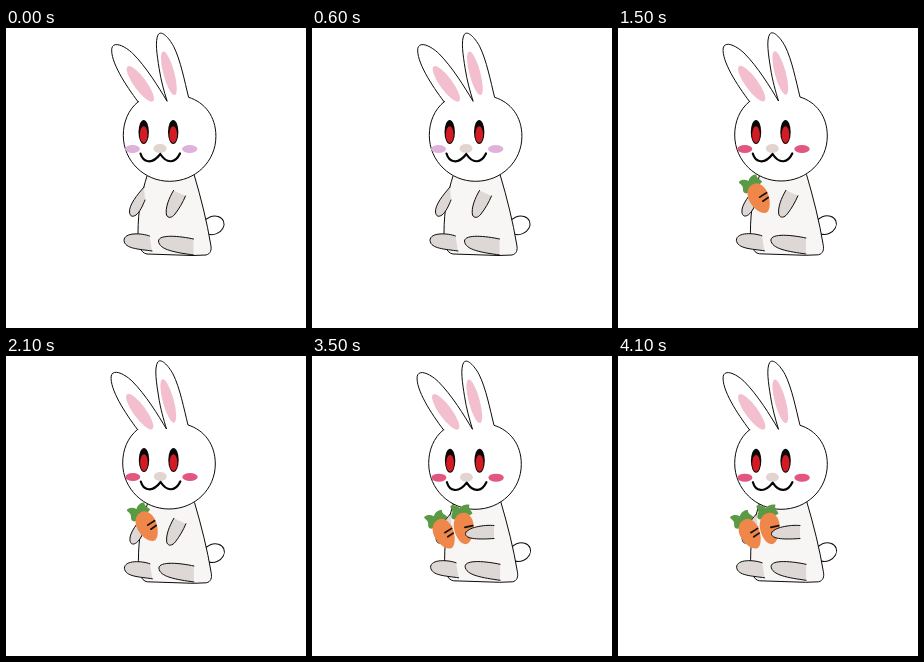
Recreate the animation shown at these times as an HTML page. Size 300 by 300 pixels, loop 4500 ms.

```html
<!DOCTYPE html>
<html lang="en">
<head>
<meta charset="utf-8">
<title>Rabbit with carrots</title>
<style>
  html, body { margin: 0; width: 100%; height: 100%; overflow: hidden; background: #fff; }
  svg { display: block; width: 100vw; height: 100vh; animation: pose 4500ms step-end infinite; }

  .line { stroke: #0d0b0b; stroke-width: 1; stroke-linejoin: round; stroke-linecap: round; }
  .edge { fill: none; }
  .white { fill: #fff; }
  .fur { fill: #f7f6f5; }
  .paw { fill: #ddd8d6; }
  .pink { fill: #f3bfcf; }
  .mouth { fill: none; stroke: #050404; stroke-width: 2.2; stroke-linecap: round; stroke-linejoin: round; }

  .head { transform: var(--head); }
  .face { transform: var(--face); }
  .body { transform: var(--body); }
  .foot { transform: translateY(var(--foot)); }
  .cheeks { fill: var(--blush); }
  .empty { visibility: var(--empty); }
  .single { visibility: var(--single); }
  .pair { visibility: var(--pair); }

  /* Each pose holds until the next hard cut. */
  @keyframes pose {
    0% {
      --head: translate(.6px, .3px); --face: translate(0, 0); --body: translate(0, 0); --foot: 0px;
      --blush: #dfb2da; --empty: visible; --single: hidden; --pair: hidden;
    }
    22.2222% {
      --head: translate(-.9px, -.2px); --face: translate(-.4px, 0); --body: translate(-.4px, .3px); --foot: 0px;
      --blush: #dfb2da; --empty: visible; --single: visible; --pair: hidden;
    }
    33.3333% {
      --head: translate(0, 0); --face: translate(.3px, 0); --body: translate(.4px, -.2px); --foot: -.8px;
      --blush: #e1577f; --empty: visible; --single: visible; --pair: hidden;
    }
    55.5556% {
      --head: translate(.2px, -.6px); --face: translate(.7px, -.8px); --body: translate(.9px, -.9px); --foot: -3px;
      --blush: #e1577f; --empty: visible; --single: visible; --pair: hidden;
    }
    77.7778%, 100% {
      --head: translate(0, .3px); --face: translate(.4px, .7px); --body: translate(.6px, -1.2px); --foot: -1.5px;
      --blush: #e1577f; --empty: hidden; --single: hidden; --pair: visible;
    }
  }
</style>
</head>
<body>
<svg viewBox="0 0 300 300" role="img" aria-label="A white rabbit holding carrots">
  <defs>
    <g id="carrot">
      <path fill="#5b9a45" d="M-9-10 C-13-12-11-14-10-17 C-9-20-12-22-11-24 C-7-25-4-23-2-20.500 C1-24 5-24 8-23 C6-19 9-18 10-14 C7-12 5-13 3-10Z"/>
      <path fill="#f0874a" d="M0-15.500 C6-16.500 10-10 10-2 C9.500 7 5 15 1 15.800 C-4 16.500-9.500 8-10-1 C-10.500-9-6-15.500 0-15.500Z"/>
      <path fill="none" stroke="#15100c" stroke-width="1.7" stroke-linecap="round" d="M1-1 L9-2 M2 4 L8.400 3"/>
    </g>
    <g id="eye">
      <ellipse rx="5.200" ry="12" fill="#080606"/>
      <ellipse cy="2.600" rx="3.900" ry="8.400" fill="#d21b23"/>
    </g>
    <path id="left-arm" d="M138 159 C131 167 123 177 123.500 184 C124 189 127 189 130 187 C134 184 137 177 139 172"/>
    <path id="right-arm" d="M167.500 162.500 C163 170 159 180 160.500 187 C162 190.500 166 190 169 186 C173 181 177 174 179.500 168"/>
    <path id="reach" d="M182 169.500 C172 168.500 155 171.500 153.500 177.500 C153 183.500 168 183.500 182 182.500"/>
    <path id="left-foot" d="M143.500 208 C136 205 118 204 118 212.500 C119 221 133 221 146 223"/>
    <path id="right-foot" d="M187.500 211 C174 208 153 206 152.500 213 C153 222 170 224.500 187.500 227"/>
  </defs>

  <g class="body">
    <ellipse class="line white" rx="11" ry="9" transform="translate(207.300 197.300) rotate(-22)"/>
    <path class="line fur" d="M141 148 C136 164 132 181 132 205 C132 216 134 225 141 226 L187 227.500 L200 227 C204.500 226 205.800 222 204.800 217 C201 194 195 170 188.200 147"/>
    <use href="#left-foot" class="paw"/>
    <use href="#left-foot" class="line edge"/>
    <g class="foot">
      <use href="#right-foot" class="paw"/>
      <use href="#right-foot" class="line edge"/>
    </g>
    <use href="#left-arm" class="paw"/>
    <use href="#left-arm" class="line edge"/>
    <g class="empty">
      <use href="#right-arm" class="paw"/>
      <use href="#right-arm" class="line edge"/>
    </g>
  </g>

  <g class="head">
    <path class="line white" d="M131.500 73.500 C121.500 81.500 116.700 94 116.700 107 C116.700 133 138 153 163 153 C189 153 209.300 133 209.300 108 C209.300 88 198 74 182 69 C178 53 174 32 167 18 C162 9 155 2 151.800 6 C148 12 150.500 27 152.500 40 C154.500 53 157.500 63 160.500 73 C152 59 140 39 126 25 C118 17.500 107 12.500 105.200 20 C103.500 33 119 57 131.500 73.500Z"/>
    <ellipse class="pink" rx="6.300" ry="21.500" transform="translate(133.700 55.600) rotate(-36)"/>
    <ellipse class="pink" rx="5.500" ry="22.500" transform="translate(162.300 45) rotate(-15)"/>
  </g>

  <g class="face">
    <use href="#eye" x="137.700" y="104"/>
    <use href="#eye" x="167.200" y="104"/>
    <g class="cheeks">
      <ellipse cx="126.500" cy="121" rx="7.500" ry="4"/>
      <ellipse cx="183.700" cy="121" rx="7.700" ry="4"/>
    </g>
    <ellipse cx="154" cy="120.500" rx="6.500" ry="4.500" fill="#e2d5cf"/>
    <path class="mouth" d="M134.500 125.500 C137 134.500 146 137 154.300 126 C161 136.500 169.500 135 174 125.500"/>
  </g>

  <g class="single">
    <use href="#carrot" transform="translate(141.300 170.500) rotate(-26)"/>
  </g>

  <g class="pair">
    <use href="#carrot" transform="translate(132.300 178) rotate(-25)"/>
    <use href="#carrot" transform="translate(152 172.500) rotate(-6)"/>
    <use href="#reach" class="paw"/>
    <use href="#reach" class="line edge"/>
  </g>
</svg>
</body>
</html>
```
